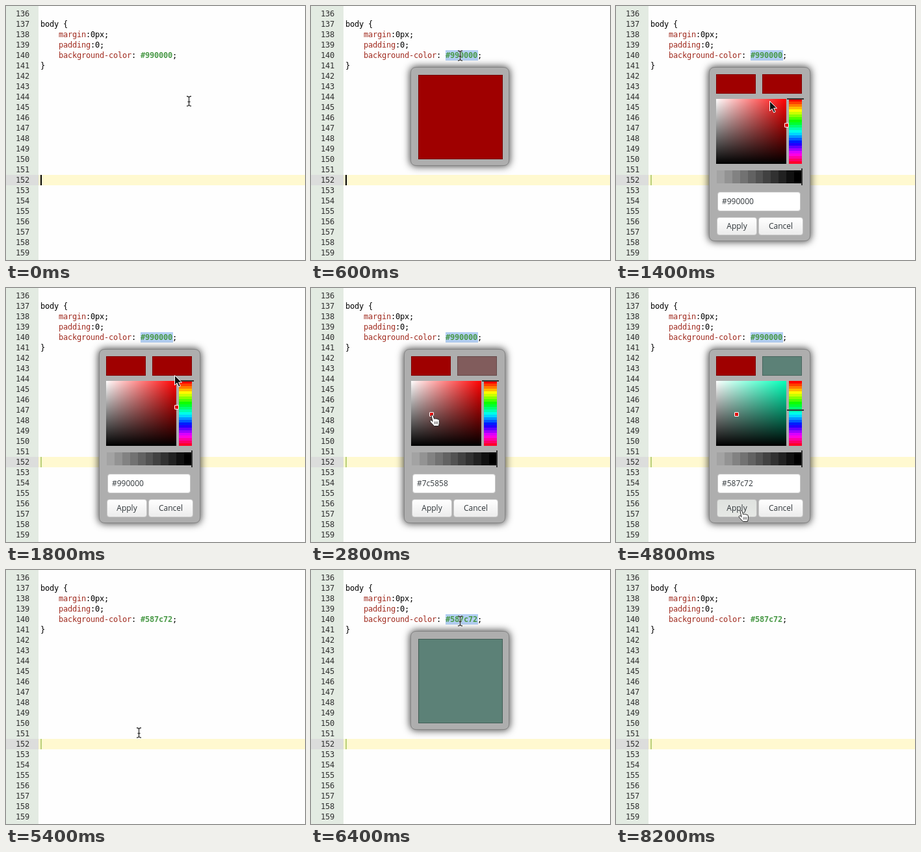
Animation of 460x391 px, one loop 8400 ms. Source, as an HTML page:

```html
<!DOCTYPE html>
<html lang="en">
<head>
<meta charset="utf-8">
<title>Colour picker in a code editor</title>
<style>
  html, body { margin: 0; width: 100%; height: 100%; overflow: hidden; background: #fefefe; }
  #stage { position: relative; width: 460px; height: 391px; overflow: hidden; background: #fefefe; }
  #stage div, #stage svg { position: absolute; box-sizing: border-box; }
  #gutter { left: 0; top: 0; width: 50px; height: 391px; background: #e3ebe2; }
  #active { left: 0; top: 260px; width: 460px; height: 16px;
    background: linear-gradient(90deg, #dcdddc 50px, #fff9d0 50px); }
  #caret { left: 53px; top: 260px; width: 2px; height: 16px; }
  .line, .num { font: 12px/16px "DejaVu Sans Mono", monospace; letter-spacing: -.224px;
    white-space: pre; height: 16px; color: #000; }
  .num { left: 15px; color: #303030; }
  .line { left: 53px; }
  .line i { font-style: normal; color: #a02a1e; }
  .line b { color: #4a9a48; }
  #select { left: 207px; top: 68px; width: 50px; height: 16px; background: #b3cff3; }
  .panel { top: 94px; background: #aeaeae; border: 1px solid #858585; border-radius: 8px;
    box-shadow: 0 0 12px 1px rgba(0, 0, 0, .72); }
  #preview { left: 153px; width: 152px; height: 152px; }
  #picker { left: 143px; width: 156px; height: 268px; }
  #big { left: 11px; top: 11px; width: 130px; height: 130px; border: 1px solid rgba(0, 0, 0, .28); }
  .swatch { top: 10px; width: 61px; height: 30px; border: 1px solid rgba(0, 0, 0, .2); }
  #old { left: 10px; }
  #new { left: 81px; }
  #field { left: 10px; top: 48px; width: 108px; height: 100px; }
  #hues { left: 122px; top: 48px; width: 20px; height: 100px; }
  #hueMark { left: 119px; width: 26px; height: 2px; background: #333; }
  #dot { width: 7px; height: 7px; background: #e01010; border: 1.5px solid #fff; border-radius: 1px; }
  #alpha { left: 11px; top: 158px; width: 131px; height: 20px; }
  #alphaMark { left: 141px; top: 155px; width: 2px; height: 26px; background: #333; }
  #hex, .button { font: 12px/27px "Open Sans", "Noto Sans", sans-serif; color: #30363a;
    border: 1px solid #c6c6c6; border-radius: 4px; }
  #hex { left: 12px; top: 191px; width: 128px; height: 30px; line-height: 28px; padding-left: 6px;
    background: #fff; }
  .button { top: 230px; height: 28px; line-height: 26px; text-align: center;
    background: linear-gradient(#fff, #ececec); }
  #apply { left: 11px; width: 62px; }
  #cancel { left: 75px; width: 69px; }
  #apply.hover { background: linear-gradient(#dfe2df, #e6e8e5); border-color: #bbb; }
  #cursor { left: 0; top: 0; width: 460px; height: 391px; }
</style>
</head>
<body>
<div id="stage">
  <div id="gutter"></div>
  <div id="active"></div>
  <div id="caret"></div>
  <div id="select"></div>
  <div id="code"></div>
  <div id="preview" class="panel"><div id="big"></div></div>
  <div id="picker" class="panel">
    <div id="old" class="swatch"></div>
    <div id="new" class="swatch"></div>
    <div id="field"></div>
    <div id="hues"></div>
    <div id="hueMark"></div>
    <div id="dot"></div>
    <div id="alpha"></div>
    <div id="alphaMark"></div>
    <div id="hex"></div>
    <div id="apply" class="button">Apply</div>
    <div id="cancel" class="button">Cancel</div>
  </div>
  <svg id="cursor" viewBox="0 0 460 391">
    <g id="beam" fill="none">
      <path d="M-3.5-7.5Q0-7.5 0-5V5Q0 7.5-3.5 7.5M3.5-7.5Q0-7.5 0-5V5Q0 7.5 3.5 7.5M-2 1H2"
        stroke="#fff" stroke-width="2.6" opacity=".7"/>
      <path d="M-3.5-7.5Q0-7.5 0-5V5Q0 7.5-3.5 7.5M3.5-7.5Q0-7.5 0-5V5Q0 7.5 3.5 7.5M-2 1H2"
        stroke="#333" stroke-width="1.3"/>
    </g>
    <path id="arrow" d="M0 0V15L3.6 11.7L6.2 17.6L8.8 16.4L6.2 10.8H11Z" fill="#111" stroke="#fff"/>
    <g id="hand" stroke="#222" stroke-linejoin="round">
      <path d="M-1.5 1Q0-1 1.5 1L3 6Q4.5 4.6 5.8 6Q7.4 5 8.5 6.7Q10.3 6 10.8 8
        L11 12Q10.8 14 9.8 17H3L-2.6 11Q-4.2 8.6-2.4 8Q-1 8 .6 10Z" fill="#fff"/>
      <path d="M3.7 10V14M6 10V14M8.3 10V14" fill="none" stroke-width=".8"/>
    </g>
  </svg>
</div>
<script>
const $ = id => document.getElementById(id);
const STEP = 200, LOOP = 8400;
const RED = [0, 1, .6], SAT = .2903, VAL = .4863;

// ms, cursor, x, y, view, [hue, saturation, value]; missing fields carry over
const steps = [
  [0, 'beam', 281, 146, 'editor', RED],
  [200, 'beam', 272, 133],
  [400, 'beam', 248, 97],
  [600, 'beam', 229, 76, 'preview'],
  [800, 'beam', 229, 82],
  [1000, 'hand', 231, 110],
  [1200, 'hand', 232, 140],
  [1400, 'arrow', 236, 146, 'picker'],
  [1600, 'arrow', 250, 140],
  [1800, 'arrow', 259, 134],
  [2000, 'arrow', 261, 160],
  [2200, 'hand', 262, 184],
  [2400, 'hand', 240, 188, 'picker', [0, .8, .56]],
  [2600, 'hand', 212, 193, 'picker', [0, .54, .5]],
  [2800, 'hand', 186, 195, 'picker', [0, SAT, VAL]],
  [3000, 'hand', 226, 178],
  [3200, 'hand', 276, 151, 'picker', [25, SAT, VAL]],
  [3400, 'hand', 281, 163, 'picker', [70, SAT, VAL]],
  [3600, 'hand', 281, 175, 'picker', [110, SAT, VAL]],
  [3800, 'hand', 281, 184, 'picker', [143, SAT, VAL]],
  [4000, 'hand', 281, 189, 'picker', [163.3, SAT, VAL]],
  [4200, 'arrow', 262, 220],
  [4400, 'arrow', 230, 275],
  [4600, 'hand', 198, 330],
  [4800, 'hand', 192, 342],
  [5200, 'beam', 194, 330, 'editor'],
  [5400, 'beam', 204, 250],
  [5600, 'beam', 219, 140],
  [5800, 'beam', 229, 78, 'preview'],
  [7800, 'beam', 262, 88],
  [8000, 'beam', 350, 130, 'editor'],
  [8200, 'none', 0, 0]
];
const COMMIT = 5200;

let view, color;
const states = steps.map(([at, cursor, x, y, v, c]) => {
  view = v || view;
  color = c || color;
  return { at, cursor, x, y, view, color };
});

function rgb([h, s, v]) {
  return [5, 3, 1].map(n => {
    const k = (n + h / 60) % 6;
    return Math.round(255 * (v - v * s * Math.max(0, Math.min(k, 4 - k, 1))));
  });
}
const toHex = c => '#' + rgb(c).map(n => n.toString(16).padStart(2, '0')).join('');
const tint = ([h, s, v]) => toHex([h, s, v * 1.04]);

// Hard-edged colour bands
function bands(dir, count, paint) {
  const stops = Array.from({ length: count }, (_, i) =>
    `${paint(i / (count - 1))} ${i / count * 100}% ${(i + 1) / count * 100}%`);
  return `linear-gradient(${dir}, ${stops.join(', ')})`;
}

function addLine(cls, n, html) {
  const el = document.createElement('div');
  el.className = cls;
  el.style.top = (n - 136) * 16 + 4 + 'px';
  el.innerHTML = html;
  $('code').append(el);
}
for (let n = 135; n < 161; n++) addLine('num', n, n);
[
  'body {',
  '    <i>margin</i>:0px;',
  '    <i>padding</i>:0;',
  '    <i>background-color</i>: <b id="value"></b>;',
  '}'
].forEach((html, i) => addLine('line', 137 + i, html));

$('hues').style.background = bands('to bottom', 25, p => `hsl(${p * 350}, 100%, 50%)`);
$('alpha').style.background = bands('to right', 11, p => {
  const g = Math.round(163 * (1 - p));
  return `rgb(${g}, ${g}, ${g})`;
});
$('old').style.background = tint(RED);

function render(t) {
  const s = states.filter(s => s.at <= t).pop();
  const [h, sat, val] = s.color;
  const saved = t < COMMIT ? RED : s.color;
  const show = (id, on) => { $(id).style.display = on ? '' : 'none'; };

  show('preview', s.view === 'preview');
  show('picker', s.view === 'picker');
  show('select', s.view !== 'editor');
  for (const kind of ['beam', 'arrow', 'hand']) {
    show(kind, s.cursor === kind);
    $(kind).setAttribute('transform', `translate(${s.x + .5} ${s.y + .5})`);
  }

  $('caret').style.background = t < 1400 ? '#000' : '#b9cf78';
  $('value').textContent = toHex(saved);
  $('big').style.background = tint(saved);
  $('new').style.background = tint(s.color);
  $('hex').textContent = toHex(s.color);
  $('field').style.background = 'linear-gradient(to top, #000, transparent), ' +
    `linear-gradient(to right, #fff, hsl(${h}, 100%, 50%))`;
  $('hueMark').style.top = 47 + h / 3.6 + 'px';
  $('dot').style.left = Math.round(7 + sat * 108) + 'px';
  $('dot').style.top = Math.round(45 + (1 - val) * 100) + 'px';
  $('apply').className = t >= 4600 ? 'button hover' : 'button';
}

let start = null, last = -1;
function tick(now) {
  if (start === null) start = now;
  const t = Math.floor((now - start) % LOOP / STEP) * STEP;
  if (t !== last) render(last = t);
  requestAnimationFrame(tick);
}
render(0);
requestAnimationFrame(tick);
</script>
</body>
</html>
```
